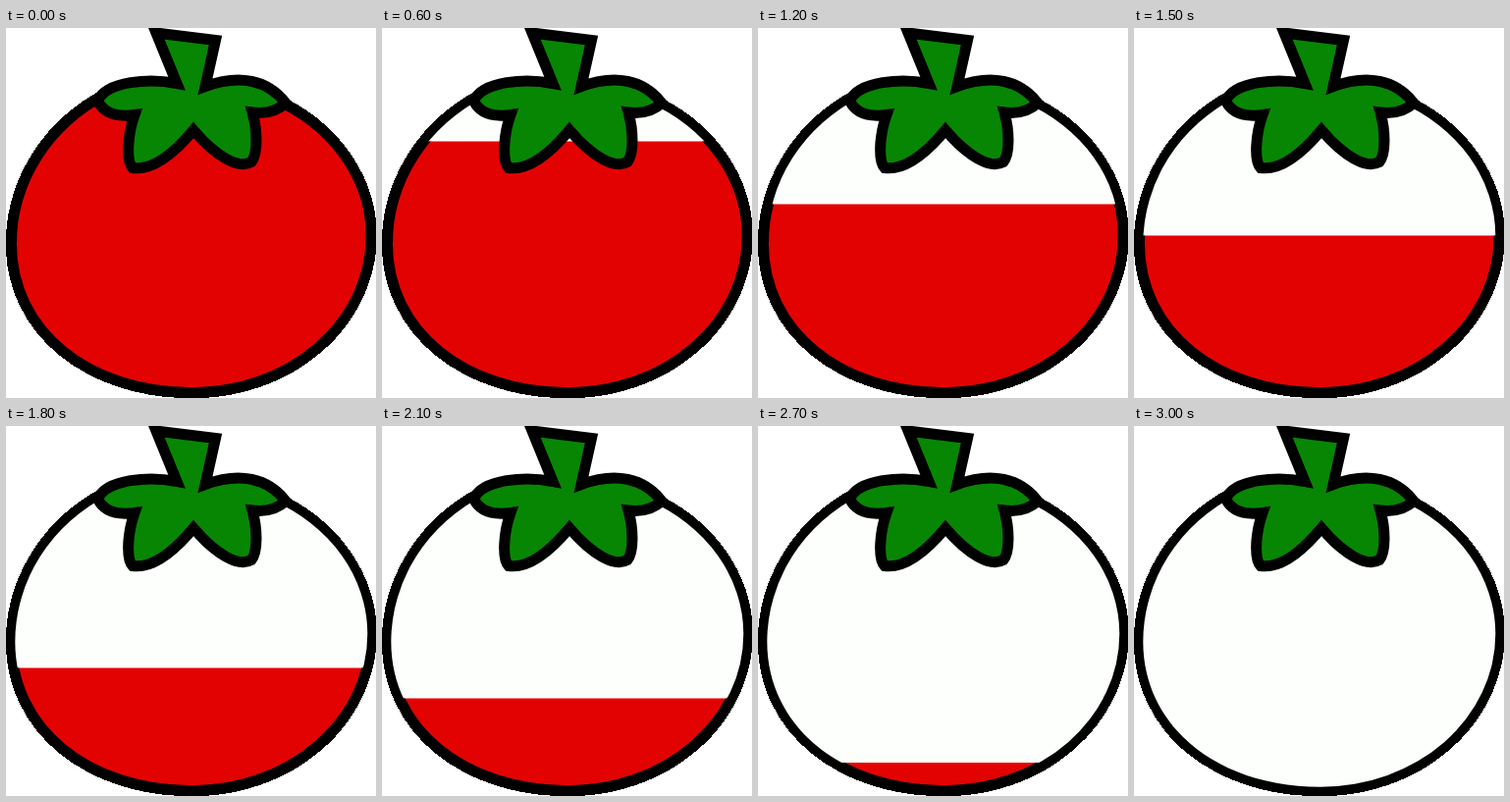
Recreate the animation shown at these times as an HTML page. Size 377 px wide and 377 px high, loop 3300 ms.

```html
<!DOCTYPE html>
<html lang="en">
<head>
<meta charset="utf-8">
<title>Draining tomato</title>
<style>
  html, body { margin: 0; width: 100%; height: 100%; overflow: hidden; background: #fff; }
  svg { display: block; width: 100vw; height: 100vh; }
</style>
</head>
<body>
<svg viewBox="0 0 377 377">
  <defs>
    <path id="body" d="M105 70 A181 170 0 0 0 9.3 220 C9.3 306 85 367.8 190 367.8
      A178.3 155.8 0 0 0 368.3 212 A178.3 153 0 0 0 270 75 Z"/>
    <clipPath id="below"><rect id="juice" width="377" height="377"/></clipPath>
  </defs>
  <use href="#body" stroke="#000" stroke-width="19" stroke-linejoin="round" shape-rendering="crispEdges"/>
  <use href="#body" fill="#fdfffc"/>
  <!-- the juice has its own thin rim -->
  <g clip-path="url(#below)"><use href="#body" fill="#e30202" stroke="#000" stroke-width="3.2"/></g>
  <path fill="#078603" stroke="#000" stroke-width="11" d="M153 5 L213.5 12.5 L203 59.5
    C238 46.5 267 53 285 76.5 C276 85 264 87.5 251 86 C256 104 257 128 250 136.5
    C237 144 214 131 191 104 C166 134 146 145 129 142.5 C122 135 124 108 131 88.5
    C112 91 99 86 93.5 74 C103 54 146 51 174 56.5 Z"/>
</svg>
<script>
  const STEP = 300;
  const levels = [0, 92.5, 115.4, 146.5, 179.5, 211.5, 246.4, 277.5, 310.5, 343, 377];
  const juice = document.getElementById("juice");

  function draw() {
    const step = Math.floor(performance.now() / STEP) % levels.length;
    juice.setAttribute("y", levels[step]);
    requestAnimationFrame(draw);
  }
  draw();
</script>
</body>
</html>
```
